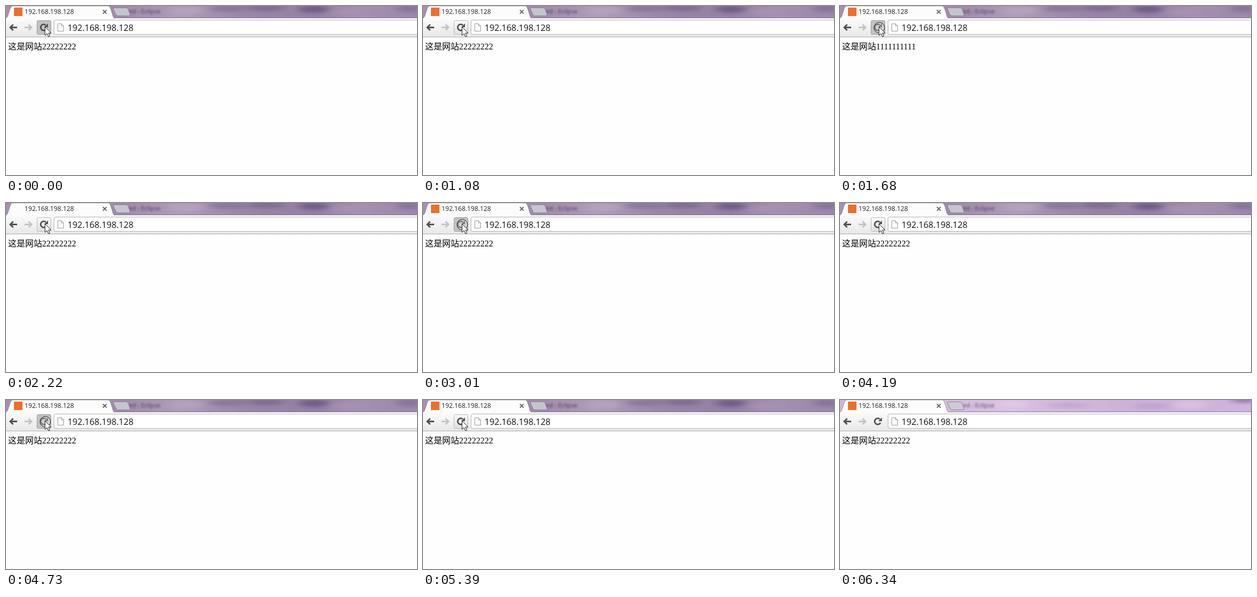
An HTML page for the animation above (6.44 s loop, 774 by 319 pixels).

```html
<!DOCTYPE html>
<html lang="zh-CN">
<head>
<meta charset="utf-8">
<title>Reload</title>
<style>
  html, body { margin: 0; width: 100%; height: 100%; overflow: hidden; background: #fefefe; }
  svg { display: block; }
  .ui { font-family: "Open Sans", "Noto Sans", sans-serif; }
  .page { font-family: "Liberation Serif", "Noto Sans CJK SC", "Noto Sans CJK", serif; font-weight: 300; }
</style>
</head>
<body>
<svg width="774" height="319" viewBox="0 0 774 319">
  <defs>
    <linearGradient id="glass">
      <stop offset="0" stop-color="#a691b0"/>
      <stop offset=".3" stop-color="#a18cab"/>
      <stop offset=".42" stop-color="#af9ab8"/>
      <stop offset=".58" stop-color="#9a86a7"/>
      <stop offset=".75" stop-color="#967fa4"/>
      <stop offset=".87" stop-color="#a48fb0"/>
      <stop offset="1" stop-color="#9c87aa"/>
    </linearGradient>
    <linearGradient id="glassLight">
      <stop offset="0" stop-color="#cbb8d6"/>
      <stop offset=".4" stop-color="#d9bfe1"/>
      <stop offset=".7" stop-color="#cdb1da"/>
      <stop offset="1" stop-color="#cfb3dc"/>
    </linearGradient>
    <linearGradient id="bar" x2="0" y2="1">
      <stop offset="0" stop-color="#fbfbfb"/>
      <stop offset="1" stop-color="#e8e8e8"/>
    </linearGradient>
    <linearGradient id="hover" x2="0" y2="1">
      <stop offset="0" stop-color="#fafafa"/>
      <stop offset="1" stop-color="#e0e0e0"/>
    </linearGradient>
    <filter id="soft" x="-50%" y="-100%" width="200%" height="300%"><feGaussianBlur stdDeviation="9 3"/></filter>
    <filter id="smear" x="-20%" y="-50%" width="140%" height="200%"><feGaussianBlur stdDeviation="1.4"/></filter>
    <clipPath id="top"><rect width="774" height="23"/></clipPath>
  </defs>

  <rect width="774" height="319" fill="#fefefe"/>

  <g clip-path="url(#top)">
    <g id="dim">
      <rect width="774" height="23" fill="url(#glass)"/>
      <g id="dimSpots" filter="url(#soft)"></g>
    </g>
    <g id="bright">
      <rect width="774" height="23" fill="url(#glassLight)"/>
      <g id="brightSpots" filter="url(#soft)"></g>
    </g>
    <text class="ui" x="231" y="13.500" font-size="11.500" fill="#30243e" opacity=".75" filter="url(#smear)">ed - Eclipse</text>
    <path d="M203 22.5H774" stroke="#85758f"/>
    <path id="newTab" d="M204 3.5H226Q229 3.5 230 6L233.500 16Q234 18.500 231 18.500H211Q208 18.500 207 16L202.500 6Q202 3.500 204 3.500Z" stroke="#8b8296"/>
  </g>

  <rect y="23" width="774" height="35" fill="url(#bar)"/>
  <path id="tab" d="M0 23C3 22 4 17 6 11C8 5 9 0 13 0H192C196 0 197 5 199 11C201 17 201 22 205 23" fill="#fcfcfc" stroke="#85798f" stroke-width=".8"/>
  <path d="M0 58.5H774" stroke="#a8a8a8"/>

  <rect id="favicon" x="15" y="3" width="16" height="16" fill="#ee6f2b"/>
  <text class="ui" x="35" y="15" font-size="12.150" fill="#222">192.168.198.128</text>
  <path d="M182.500 7.500L189.500 14.500M189.500 7.500L182.500 14.500" stroke="#666" stroke-width="1.8"/>

  <g fill="none" stroke-width="3">
    <path d="M21 40.500H8M13.500 35L8 40.500L13.500 46" stroke="#505050"/>
    <path d="M35 40.500H48M42.500 35L48 40.500L42.500 46" stroke="#c3c3c3"/>
  </g>

  <rect id="button" x="58.500" y="27.500" width="26" height="26" rx="2"/>
  <path d="M76.300 43A5.800 5.800 0 1 1 75 36" fill="none" stroke="#505050" stroke-width="2.800"/>
  <path d="M79 33V40H72Z" fill="#505050"/>

  <path d="M774 26.500H93Q90.500 26.500 90.500 29V51Q90.500 53.500 93 53.500H774" fill="#fff" stroke="#b2b2b2"/>
  <path d="M97.500 33.500H104.500L108.500 37.500V47.500H97.500ZM104.500 33.500V37.500H108.500" fill="#fafafa" stroke="#999"/>
  <text class="ui" x="116" y="47" font-size="16.200" fill="#111">192.168.198.128</text>

  <text id="body" class="page" x="4" y="82" font-size="16" fill="#000"></text>

  <circle id="ring" cx="74" cy="41" r="10" fill="#fff" fill-opacity=".25" stroke="#222"/>
  <path id="cursor" d="M0 0V16L3.800 12.500L6.500 18.500L9 17.500L6.500 11.500H11.500Z" fill="#fff" stroke="#222" stroke-linejoin="round"/>
</svg>

<script>
const LOOP = 6440;
const $ = id => document.getElementById(id);
const show = (id, on) => $(id).setAttribute('visibility', on ? 'visible' : 'hidden');

// p: pressed, r: pressed with click ring, h: released with ring, l: loading, i: idle, a: pointer away
const steps = [
  [0, 'p'], [120, 'l'], [270, 'i'], [390, 'r'], [540, 'l'], [690, 'i'], [810, 'r'], [930, 'l'],
  [1080, 'i'], [1200, 'p'], [1320, 'r'], [1440, 'l'], [1560, 'i'], [1680, 'r'], [1800, 'l'],
  [1950, 'i'], [2070, 'h'], [2220, 'l'], [2340, 'i'], [2620, 'r'], [2740, 'l'], [2890, 'i'],
  [3010, 'r'], [3130, 'l'], [3250, 'i'], [3530, 'r'], [3680, 'l'], [3830, 'i'], [3950, 'r'],
  [4070, 'l'], [4190, 'i'], [4340, 'r'], [4460, 'l'], [4610, 'i'], [4730, 'r'], [4850, 'l'],
  [5000, 'i'], [5120, 'r'], [5270, 'l'], [5390, 'i'], [5660, 'a']
];
const pointerPath = [[0, 73, 39], [5660, 200, 120], [5780, 500, 245], [5900, 736, 317]];
const firstSite = [[1560, 1950], [3830, 4190]];

const current = (list, t) => list.filter(item => item[0] <= t).pop();

// Each spot: x, y, rx, ry, colour
function addSpots(id, spots) {
  $(id).innerHTML = spots.map(([x, y, rx, ry, color]) =>
    `<ellipse cx="${x}" cy="${y}" rx="${rx}" ry="${ry}" fill="${color}"/>`).join('');
}
addSpots('dimSpots', [
  [340, 9, 32, 8, '#b5a0bd'], [420, 5, 38, 6, '#8a769c'], [490, 4, 34, 6, '#7f6b94'],
  [580, 6, 28, 7, '#6f5d88'], [645, 12, 30, 7, '#a791b2'], [760, 5, 24, 7, '#87729b']
]);
addSpots('brightSpots', [
  [325, 8, 30, 8, '#e0c8e7'], [430, 10, 40, 5, '#c2a8cf'], [585, 11, 34, 5, '#bda2cc'],
  [660, 9, 32, 8, '#dac0e3'], [760, 1, 24, 4, '#8d74aa']
]);

function draw(t) {
  const state = current(steps, t)[1];
  const pressed = state === 'p' || state === 'r';
  const [, x, y] = current(pointerPath, t);
  const bright = t >= 6340;
  const first = firstSite.some(([from, to]) => t >= from && t < to);

  show('favicon', state !== 'l');
  show('button', state !== 'a');
  $('button').setAttribute('fill', pressed ? '#c2c2c2' : 'url(#hover)');
  $('button').setAttribute('stroke', pressed ? '#999' : '#b8b8b8');
  show('ring', state === 'r' || state === 'h');
  show('cursor', t < 6050);
  $('cursor').setAttribute('transform', `translate(${x + .5} ${y + .5})`);
  $('body').textContent = '这是网站' + (first ? '1'.repeat(10) : '2'.repeat(8));
  show('dim', !bright);
  show('bright', bright);
  $('newTab').setAttribute('fill', bright ? '#cfc8d6' : '#c6c5cf');
}

const start = performance.now();
function tick() {
  draw((performance.now() - start) % LOOP);
  requestAnimationFrame(tick);
}
draw(0);
requestAnimationFrame(tick);
</script>
</body>
</html>
```
